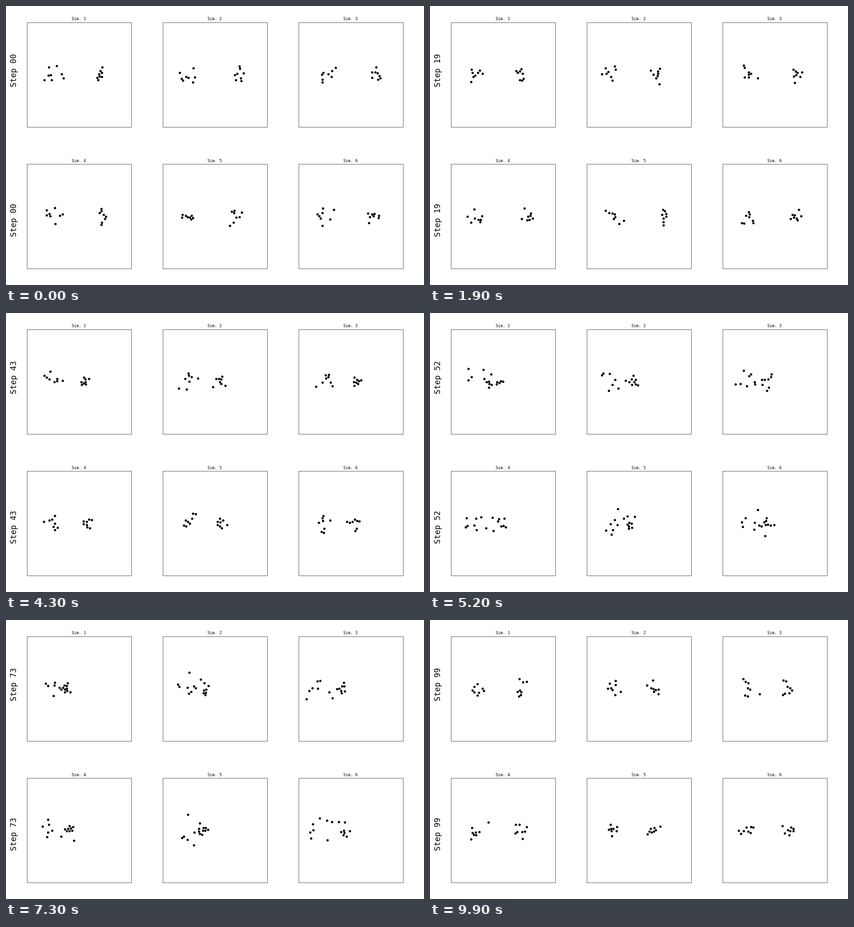
A matplotlib script that plays this animation: 917 by 611 pixels, repeating every 10 s.

```python
import matplotlib.pyplot as plt
import numpy as np
from matplotlib.animation import FuncAnimation
from matplotlib.patches import Rectangle

W, H, DPI = 917, 611, 64
PT = 72 / DPI  # points per pixel
FRAMES, INTERVAL = 100, 100
FONT = "DejaVu Sans Mono"
SIDE, PITCH_X, PITCH_Y = 229, 298, 310.5
N = 8                   # dots per cluster
MIN_GAP = 5.4           # closest allowed distance between dots
HOME_X, MID_Y = 57, 113  # resting cluster, from the panel's corner

# Steps at which the travelling cluster turns: far, near, far, near, ...
TURNS = np.array([0, 9, 18, 28, 37, 49, 63, 73, 80, 86, 96, 106])


def separate(pos):
    """Push overlapping dots apart until they just touch."""
    for _ in range(25):
        delta = pos[:, None] - pos[None]
        dist = np.hypot(delta[..., 0], delta[..., 1]) + 1e-6
        push = np.clip(MIN_GAP - dist, 0, None) / dist
        pos = pos + 0.4 * (delta * push[..., None]).sum(axis=1)
    return pos


class Sim:
    def __init__(self, seed):
        rng = np.random.default_rng(seed)
        shape = (3, 2 * N, 2)
        self.freq = 2 * np.pi / rng.uniform(9, 38, shape)
        self.phase = rng.uniform(0, 2 * np.pi, shape)
        self.reach = rng.uniform(-10, 10, len(TURNS))
        self.reach[::2] += 163
        self.reach[1::2] += 92

    def guest_x(self, step):
        """Cosine easing from one turn to the next."""
        i = np.searchsorted(TURNS, step, side="right") - 1
        u = (step - TURNS[i]) / (TURNS[i + 1] - TURNS[i])
        a, b = self.reach[i:i + 2]
        return a + (b - a) * (1 - np.cos(np.pi * u)) / 2

    def dots(self, step):
        wander = np.sin(self.freq * step + self.phase).sum(axis=0) * np.sqrt(2 / 3)
        x = self.guest_x(step)
        # The resting cluster scatters as the other one closes in
        spread = 1 + np.clip((122 - x) / 45, 0, 1)
        rest = (HOME_X, MID_Y) + wander[:N] * (10.5, 9) * spread
        drift = wander[N:] - wander[N:].mean(axis=0)
        guest = (x, MID_Y + 1) + drift * (7, 9.5)
        return separate(np.vstack([rest, guest]))


fig = plt.figure(figsize=(W / DPI, H / DPI), dpi=DPI, facecolor="white")
ax = fig.add_axes([0, 0, 1, 1])
ax.set(xlim=(0, W), ylim=(H, 0))
ax.axis("off")

corners = [(46 + PITCH_X * col, 36 + PITCH_Y * row)
           for row in range(2) for col in range(3)]
sims, clouds = [], []
for k, (x, y) in enumerate(corners, 1):
    ax.add_patch(Rectangle((x, int(y)), SIDE, SIDE, fill=False, ec="black", lw=0.65 * PT))
    ax.text(x + SIDE / 2 - 0.5, y - 5, f"Sim. {k}", family=FONT, size=8.6 * PT,
            ha="center", va="baseline")
    sims.append(Sim(k))
    clouds.append(ax.plot([], [], "o", color="black", ms=5.1 * PT, mew=0)[0])

labels = [ax.text(22.6, y, "", family=FONT, size=17.2 * PT, rotation=90,
                  rotation_mode="anchor", ha="center", va="baseline")
          for y in (141, 469)]


def draw(step):
    for sim, cloud, corner in zip(sims, clouds, corners):
        cloud.set_data(*(sim.dots(step) + corner).T)
    for label in labels:
        label.set_text(f"Step {step:02d}")
    return clouds + labels


anim = FuncAnimation(fig, draw, frames=FRAMES, interval=INTERVAL,
                     repeat=True, repeat_delay=0)
plt.show()
```
